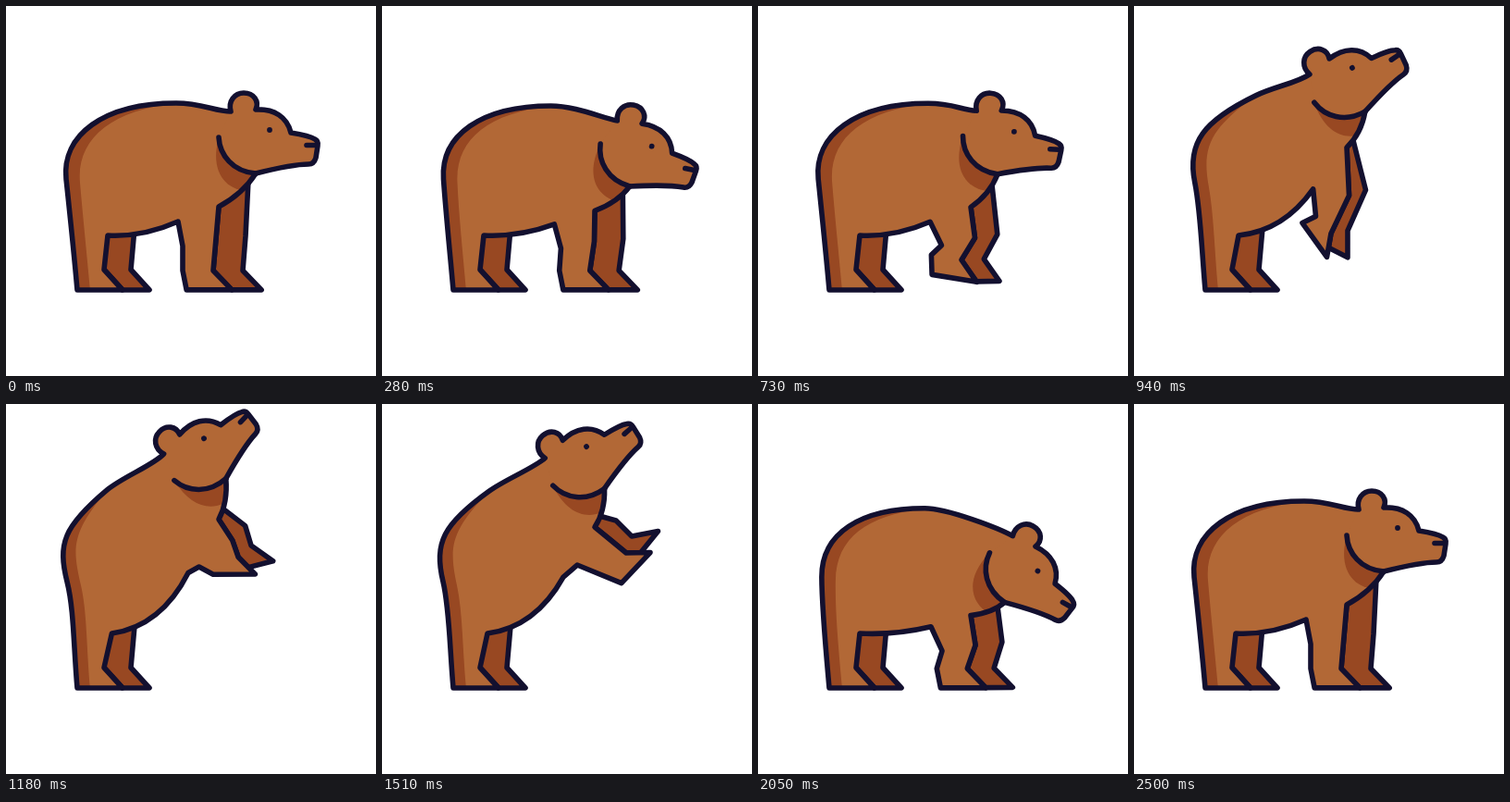
These frames come from a looping animation (400 by 400 pixels, 2560 ms). An HTML page with a canvas:

```html
<!DOCTYPE html>
<html lang="en">
<head>
<meta charset="utf-8">
<title>Bear</title>
<style>
html, body { margin: 0; width: 100%; height: 100%; overflow: hidden; background: #fff; }
canvas { display: block; width: 400px; height: 400px; }
</style>
</head>
<body>
<canvas id="stage" width="400" height="400"></canvas>
<script>
const ctx = document.getElementById('stage').getContext('2d');
const LOOP = 2560;
const FUR = '#b26836', SHADE = '#984822', INK = '#13102f';

// The head and the front paws lead; the rest of the body follows them.
// eye: x, y, head turn   paw: ankle x, y, knee bend, paw turn   far: offset of the far leg
const pose = (eye, paw, far) => [...eye, ...paw, ...far];
const stand = pose([285, 134, 0], [224, 286, 0, 0], [32, 0]);
const crouch = pose([303, 182, 30], [226, 286, 7, 0], [29, 0]);
const rise = pose([236, 67, -34], [213, 246, 11, 20], [18, -3]);
const peak = pose([213, 36, -47], [256, 160, 3, -45], [13, -14]);
const reach = pose([221, 46, -41], [264, 161, 0, -81], [6, -18]);
const drop = pose([253, 99, -18], [238, 266, 2, 0], [28, -22]);
const land = pose([272, 117, -10], [231, 286, 3, 0], [28, -18]);

const keys = [
  [100, stand], [540, crouch], [940, rise], [1230, peak], [1510, reach],
  [1720, drop], [1810, land], [2080, crouch], [2500, stand]
];

// Slope that never overshoots a key
function slope(k, i) {
  if (k === 0 || k === keys.length - 1) return 0;
  const rate = n => (keys[n + 1][1][i] - keys[n][1][i]) / (keys[n + 1][0] - keys[n][0]);
  const a = rate(k - 1), b = rate(k);
  return a * b <= 0 ? 0 : 2 * a * b / (a + b);
}

function poseAt(time) {
  const last = keys.length - 1;
  if (time <= keys[0][0] || time >= keys[last][0]) return stand;
  const k = keys.findIndex(key => key[0] > time) - 1;
  const [t0, from] = keys[k], [t1, to] = keys[k + 1];
  const span = t1 - t0, u = (time - t0) / span, v = 1 - u;
  return from.map((p, i) =>
    p * v * v * (1 + 2 * u) + to[i] * u * u * (3 - 2 * u) +
    span * u * v * (v * slope(k, i) - u * slope(k + 1, i)));
}

const clamp = x => Math.min(1, Math.max(0, x));
const add = (p, x, y) => [p[0] + x, p[1] + y];
const lerp = (p, q, k) => [p[0] + k * (q[0] - p[0]), p[1] + k * (q[1] - p[1])];
const extend = (p, handle, k) => lerp(p, handle, -k);
const polar = (p, length, degrees) => {
  const a = degrees * Math.PI / 180;
  return add(p, length * Math.cos(a), length * Math.sin(a));
};

function polyline(points) {
  const path = new Path2D();
  points.forEach(p => path.lineTo(...p));
  return path;
}

function paint(path, fill) {
  ctx.fillStyle = fill;
  ctx.fill(path);
  ctx.stroke(path);
}

const farHindLeg = polyline([[110, 246], [139, 240], [135, 285], [155, 307], [126, 307], [106, 285]]);

// Head parts, measured from the eye
const skull = new Path2D(`M-42-20C-45-31-38-40-28-40C-17-40-11-31-15-22
  C5-23 19-14 23 3C36 5 46 8 49 10Q53 12 52 17L50 30Q48 37 42 37C30 37 5 42-15 47`);
const cheek = new Path2D('M-15 47C-40 45-54 27-55 8');
const headFill = new Path2D(skull);
headFill.bezierCurveTo(-40, 45, -54, 27, -55, 8);
const neckShade = new Path2D('M-55 8C-65 45-48 66-22 66L10 60L-15 40Z');
const nose = new Path2D('M40 16.5H50');

function drawHead(turn) {
  ctx.fillStyle = FUR;
  ctx.fill(headFill);
  [skull, cheek, nose].forEach(path => ctx.stroke(path));
  ctx.fillStyle = INK;
  ctx.beginPath();
  ctx.arc(0, 0, 2.9, 0, 2 * Math.PI);
  ctx.fill();
}

function draw(time) {
  const [eyeX, eyeY, turn, ankleX, ankleY, bend, pawTurn, farX, farY] = poseAt(time);
  const raised = Math.max(0, (134 - eyeY) / 88);
  const ducked = Math.max(0, (eyeY - 134) / 48);
  const lift = clamp((raised - 0.25) / 0.4);
  const follow = (x, y, [rx, ry], [dx, dy]) =>
    [x + raised * rx + ducked * dx, y + raised * ry + ducked * dy];

  const angle = turn * Math.PI / 180, cos = Math.cos(angle), sin = Math.sin(angle);
  const onHead = (x, y) => [eyeX + x * cos - y * sin, eyeY + x * sin + y * cos];
  const inHeadSpace = action => {
    ctx.save();
    ctx.translate(eyeX, eyeY);
    ctx.rotate(angle);
    action();
    ctx.restore();
  };

  const hip = follow(65, 187, [1, 5], [4, 0]);
  const rumpHandle = follow(60, 140, [-4, 10], [9, 0]);
  const backHandle = follow(105, 105, [-39, 25], [5, 8]);
  const top = follow(184, 105, [-68, -11], [-4, 8]);
  const shoulder = follow(230, 217, [0, -84], [0, 12]);
  const belly = follow(186, 233, [10, -46], [1, 8]);
  const jaw = onHead(-15, 47);

  // Near front leg; the sole folds to a point as the paw lifts
  const ankle = [ankleX, ankleY];
  const knee = add(lerp(shoulder, ankle, 0.5), bend, bend / 2);
  const toeAngle = 46 + pawTurn + 34 * lift;
  const toe = polar(ankle, 29 - 3 * lift, toeAngle);
  const sole = polar(toe, -49 * (1 - lift), pawTurn);
  const heel = polar(ankle, -33, pawTurn);
  const elbow = add(knee, -36, (belly[1] - shoulder[1]) / 2);

  // Far front leg copies the near one at an offset
  const loose = clamp(lift - farY / 18);
  const farAnkle = add(ankle, farX, farY);
  const farLeg = polyline([
    shoulder, lerp(shoulder, jaw, 0.8 - 0.5 * loose), add(knee, farX, farY - 3), farAnkle,
    polar(farAnkle, 29, toeAngle - 10 * loose), lerp(ankle, toe, 1 - 0.4 * loose), ankle, knee
  ]);
  farLeg.closePath();

  const body = new Path2D();
  body.moveTo(...jaw);
  body.quadraticCurveTo(...add(lerp(jaw, shoulder, 0.5), 6, 4), ...shoulder);
  [knee, ankle, toe, sole, heel, elbow, belly].forEach(p => body.lineTo(...p));
  body.quadraticCurveTo(148 + 18 * raised, 250 - 9 * raised, 110 + 4 * raised, 248);
  [[106, 285], [126, 307], [77, 307]].forEach(p => body.lineTo(...p));
  body.bezierCurveTo(73, 262, ...extend(hip, rumpHandle, 0.7), ...hip);
  body.bezierCurveTo(...rumpHandle, ...backHandle, ...top);
  body.bezierCurveTo(...extend(top, backHandle, 0.35), ...onHead(-59, -20), ...onHead(-42, -20));

  const rump = new Path2D();
  const inner = add(hip, 15, 4), innerHandle = add(rumpHandle, 16, 4);
  rump.moveTo(91, 308);
  rump.bezierCurveTo(87, 264, ...extend(inner, innerHandle, 0.7), ...inner);
  rump.bezierCurveTo(...innerHandle, ...add(backHandle, 8, 8), ...top);
  [[top[0], 0], [0, 0], [0, 308]].forEach(p => rump.lineTo(...p));

  ctx.fillStyle = '#fff';
  ctx.fillRect(0, 0, 400, 400);
  ctx.strokeStyle = INK;
  ctx.lineWidth = 5.6;
  ctx.lineCap = ctx.lineJoin = 'round';

  paint(farLeg, SHADE);
  paint(farHindLeg, SHADE);
  ctx.fillStyle = FUR;
  ctx.fill(body);
  ctx.save();
  ctx.clip(body);
  ctx.fillStyle = SHADE;
  ctx.fill(rump);
  inHeadSpace(() => ctx.fill(neckShade));
  ctx.restore();
  ctx.stroke(body);
  inHeadSpace(drawHead);
}

const start = performance.now();
function tick() {
  draw((performance.now() - start) % LOOP);
  requestAnimationFrame(tick);
}
tick();
</script>
</body>
</html>
```
